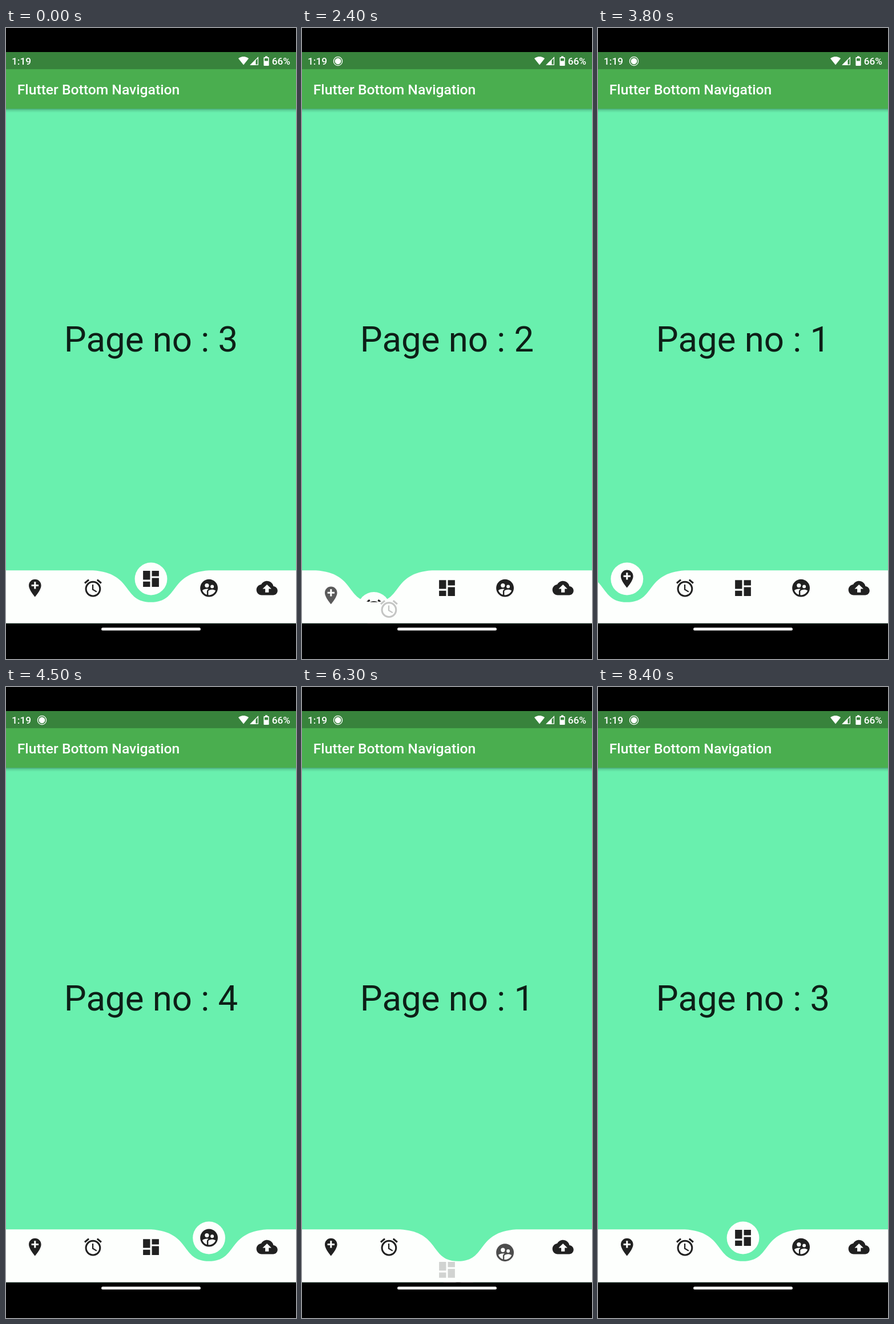
An HTML page for the animation above (8.6 s loop, 508 px wide and 1102 px high).

```html
<!DOCTYPE html>
<html lang="en">
<head>
<meta charset="utf-8">
<title>Flutter Bottom Navigation</title>
<style>
  html, body { margin: 0; width: 100%; height: 100%; overflow: hidden; background: #000; }
  svg { display: block; width: 100vw; height: 100vh; font-family: Roboto, "Noto Sans", sans-serif; }
  .medium { font-weight: 500; fill: #fff; }
</style>
</head>
<body>
<svg viewBox="0 0 508 1102">
  <defs>
    <linearGradient id="shade" x2="0" y2="1">
      <stop offset="0" stop-color="#000" stop-opacity=".3"/>
      <stop offset=".4" stop-color="#000" stop-opacity=".11"/>
      <stop offset="1" stop-color="#000" stop-opacity="0"/>
    </linearGradient>
  </defs>

  <rect width="508" height="1102"/>
  <rect y="141" width="508" height="899" fill="#69f0ae"/>
  <rect y="141" width="508" height="7" fill="url(#shade)"/>
  <rect y="42.2" width="508" height="98.8" fill="#4aae4f"/>
  <rect y="42.2" width="508" height="29.7" fill="#38833c"/>

  <g class="medium" font-size="17.3">
    <text x="10" y="64">1:19</text>
    <text x="498" y="64" text-anchor="end">66%</text>
  </g>
  <g id="recorder" fill="#fff">
    <circle cx="63" cy="58" r="7.6" fill="none" stroke="#fff" stroke-width="1.3"/>
    <circle cx="63" cy="58" r="5.4"/>
  </g>
  <g fill="#fff">
    <path transform="translate(406.8 47.8) scale(.773)" d="M12 21.5L23.64 7C23.2 6.66 18.7 3 12 3S.81 6.66.36 7z"/>
    <path d="M427.5 64.8L437.5 54.8V64.8z"/>
    <path d="M428.8 64.2L441.4 51.6V64.2z" fill="none" stroke="#fff" stroke-width="1.3"/>
    <path fill-rule="evenodd" d="M454 49.2h4v1.8h1.6q1 0 1 1v13q0 1-1 1h-7.2q-1 0-1-1v-13q0-1 1-1h1.6zM453 53v4.6h6V53z"/>
  </g>
  <text class="medium" x="19.8" y="115.5" font-size="24.69">Flutter Bottom Navigation</text>
  <text id="page" x="254" y="565" font-size="61.73" text-anchor="middle" fill-opacity=".87"></text>

  <g id="button">
    <circle r="28.4" fill="#fdfffd"/>
    <path id="buttonIcon" fill="#212121" fill-rule="evenodd"/>
  </g>
  <path id="bar" fill="#fdfffd"/>
  <g id="items" fill="#212121"></g>

  <rect y="1039.8" width="508" height="63"/>
  <rect x="167" y="1047.3" width="174" height="5" rx="2.5" fill="#f5f5f5"/>
</svg>

<script>
const $ = id => document.getElementById(id);
const W = 508, DP = W / 411.43, COUNT = 5, CELL = W / COUNT;
const BOTTOM = 1039.8, BAR = 75 * DP, TOP = BOTTOM - BAR;
const LOOP = 8600, MOVE = 600, STEP = 100, FIRST = 2;

// [time, tapped item]
const taps = [[761, 0], [2012, 1], [2950, 0], [3870, 3], [4620, 1],
              [5390, 4], [6017, 0], [6690, 2]];

const icons = [
  // pin with plus
  "M12 2C8.14 2 5 5.14 5 9c0 5.25 7 13 7 13s7-7.75 7-13c0-3.86-3.14-7-7-7zm4 8h-3v3h-2v-3H8V8h3V5h2v3h3v2z",
  // alarm clock
  "M22 5.72l-4.6-3.86-1.29 1.53 4.6 3.86zM7.88 3.39L6.6 1.86 2 5.71l1.29 1.53zM12.5 8H11v6l4.75 2.85.75-1.23-4-2.37zM12 4a9 9 0 1 0 0 18a9 9 0 1 0 0-18zm0 16a7 7 0 1 1 0-14a7 7 0 1 1 0 14z",
  // dashboard
  "M3 13h8V3H3zm0 8h8v-6H3zm10 0h8V11h-8zm0-18v6h8V3z",
  // people in a circle
  "M12 2a10 10 0 1 0 0 20a10 10 0 1 0 0-20zM15.6 8.34a1.93 1.93 0 1 1 0 3.86a1.93 1.93 0 1 1 0-3.86zM9.6 6.76a2.36 2.36 0 1 1 0 4.72a2.36 2.36 0 1 1 0-4.72zm0 9.13v3.75c-2.4-.75-4.3-2.6-5.14-4.96 1.05-1.12 3.67-1.69 5.14-1.69.53 0 1.2.08 1.9.22-1.64.87-1.9 2.02-1.9 2.68zM12 20c-.27 0-.53-.01-.8-.04v-4.07c0-1.42 2.94-2.13 4.4-2.13 1.07 0 2.92.39 3.84 1.15C18.27 17.88 15.38 20 12 20z",
  // cloud with arrow
  "M19.35 10.04C18.67 6.59 15.64 4 12 4 9.11 4 6.6 5.64 5.35 8.04 2.34 8.36 0 10.91 0 14c0 3.31 2.69 6 6 6h13c2.76 0 5-2.24 5-5 0-2.64-2.05-4.78-4.65-4.96zM14 13v4h-4v-4H7l5-5 5 5z"
];

const place = (x, y) => `translate(${x} ${y})`;
const ICON_FIT = `scale(${30 * DP / 24}) translate(-12 -12)`;
$("buttonIcon").setAttribute("transform", ICON_FIT);

const items = icons.map(d => {
  const path = document.createElementNS("http://www.w3.org/2000/svg", "path");
  path.setAttribute("d", d);
  path.setAttribute("fill-rule", "evenodd");
  return $("items").appendChild(path);
});

// cubic-bezier(.42, 0, .58, 1)
function easeInOut(x) {
  let lo = 0, hi = 1;
  for (let i = 0; i < 24; i++) {
    const s = (lo + hi) / 2, u = 1 - s;
    if (1.26 * s * u * u + 1.74 * s * s * u + s ** 3 < x) lo = s; else hi = s;
  }
  return lo * lo * (3 - 2 * lo);
}

function notch(pos) {
  const left = pos / COUNT;
  const p = (x, y) => `${(left + x) * W} ${TOP + y * BAR}`;
  return `M${Math.min(0, (left - .1) * W)} ${TOP}L${p(-.1, 0)}` +
    `C${p(.04, .05)} ${p(0, .6)} ${p(.1, .6)}` +
    `C${p(.2, .6)} ${p(.16, .05)} ${p(.3, 0)}` +
    `L${Math.max(W, (left + .3) * W)} ${TOP}V${BOTTOM}H0z`;
}

function draw(t) {
  let from = FIRST, to = FIRST, start = -MOVE;
  for (const [time, item] of taps)
    if (time <= t) [from, to, start] = [to, item, time];

  const k = t - start >= MOVE ? 1 : easeInOut((t - start) / MOVE);
  const pos = from + (to - from) * k;
  const hide = 1 - Math.abs(1 - 2 * k);

  $("recorder").style.display = t < 300 ? "none" : "";
  $("page").textContent = `Page no : ${to + 1}`;
  $("bar").setAttribute("d", notch(pos));
  $("button").setAttribute("transform",
    place((pos + .5) * CELL, BOTTOM + (80 * hide - 63) * DP));
  $("buttonIcon").setAttribute("d", icons[k > .5 ? to : from]);

  items.forEach((el, i) => {
    const gap = Math.min(1, Math.abs(pos - i));
    const y = BOTTOM - 50 * DP + (1 - gap) * 40 * DP;
    el.setAttribute("transform", place((i + .5) * CELL, y) + ICON_FIT);
    el.setAttribute("opacity", gap < .99 ? gap : 1);
  });
}

const begin = performance.now();
function tick() {
  const t = (performance.now() - begin) % LOOP;
  draw(Math.floor(t / STEP) * STEP);
  requestAnimationFrame(tick);
}
tick();
</script>
</body>
</html>
```
